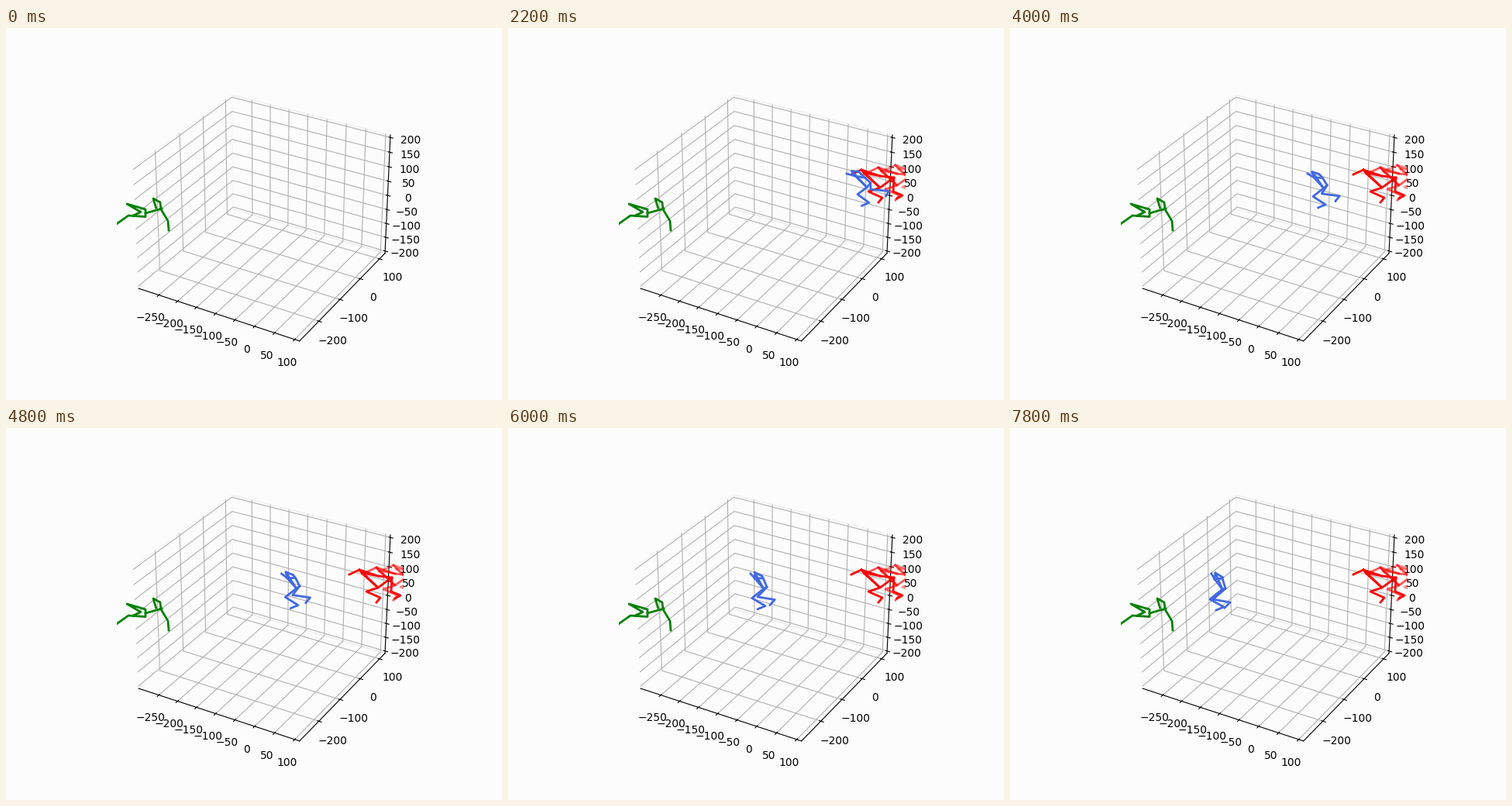
Recreate the animation shown at these times as a matplotlib script. Size 640 px wide and 480 px high, loop 8 s.

```python
import matplotlib.pyplot as plt
import numpy as np
from matplotlib.animation import FuncAnimation

STEP = 200            # ms per frame
FRAMES = 40
RUN_START, RUN_END = 1800, 7800
BACK = "#fcfcfc"

fig = plt.figure(figsize=(6.4, 4.8), dpi=100, facecolor=BACK)

# 3D stage: the box reaches 1/48 past a span of 400 on each side
ax = fig.add_subplot(projection="3d", facecolor=BACK)
half = 200 * 25 / 24
for set_lim, mid in ((ax.set_xlim, -96.6), (ax.set_ylim, -79.5), (ax.set_zlim, 0)):
    set_lim(mid - half, mid + half)
ax.set_xticks(range(-250, 101, 50))
ax.set_yticks(range(-200, 101, 100))
ax.set_zticks(range(-200, 201, 50))
for axis in (ax.xaxis, ax.yaxis, ax.zaxis):
    axis.pane.set_fill(False)

# Overlay in pixel coordinates, clipped to the same square as the stage
top = fig.add_axes([0.22375, 0.11, 0.5775, 0.77])
top.set_xlim(143.2, 512.8)
top.set_ylim(427.2, 57.6)
top.set_axis_off()


def bone(points, color, alpha=1.0):
    return top.plot(*np.transpose(points), color=color, lw=2, alpha=alpha)[0]


# Resting figure
for path in (
    [(141, 254), (158, 242), (180, 243.5), (180, 234), (156, 227), (174, 237.5), (164, 242)],
    [(180, 239), (201, 233)],
    [(193.5, 232), (190, 220), (199, 225), (200, 234), (209, 249), (210, 261)],
):
    bone(path, "green")

# Joints: hand, elbow, neck, other hand, other elbow, two hips,
# then knee, ankle and toe of each leg, measured from the first hand
LIMBS = [
    [0, 1, 2, 6, 10, 11, 12],
    [1, 5, 7, 8, 9],
    [1, 3, 4, 2],
    [3, 5, 6],
]
CROUCH = np.array([
    (0, 0), (13, -6), (37, 2), (17, -1), (18, -2), (37, 17), (55, 4),
    (22, 22), (40, 30), (35, 36), (54, 22), (66, 27), (59, 31)])
STRIDE = np.array([
    (0, 0), (13, 2), (26, 5), (7, -4), (15, -5), (29, 17), (34, 10),
    (18, 25), (32, 36), (23, 40), (38, 17), (62, 19), (59, 25)])
UPRIGHT = np.array([
    (0, 0), (4, 7), (14, 6), (5, -1), (15, 5), (14, 20), (18, 19),
    (-2, 33), (16, 43), (6, 47), (2, 33), (24, 37), (17, 44)])

# Red figures appear one after another, the faintest first and furthest right
ghosts = []
for k, alpha in ((2, 0.45), (1, 0.65), (0, 1.0)):
    body = CROUCH + (443 + 22 * k, 189 - 3 * k)
    ghosts.append((RUN_START - 600 * k, [bone(body[limb], "red", alpha) for limb in LIMBS]))

runner = [bone([(0, 0)], "royalblue") for _ in LIMBS]


def runner_joints(t):
    u = max(0, (t - RUN_START) / (RUN_END - RUN_START))
    x = 447 - 187 * u + 2 * np.sin(np.pi * u) + 5 * np.sin(2 * np.pi * u)
    return STRIDE + (UPRIGHT - STRIDE) * u ** 0.6 + (x, 188)


def draw(i):
    t = i * STEP
    for start, lines in ghosts:
        for line in lines:
            line.set_visible(t >= start)
    joints = runner_joints(t)
    for line, limb in zip(runner, LIMBS):
        line.set_data(*joints[limb].T)
        line.set_visible(t >= RUN_START)
    return runner


anim = FuncAnimation(fig, draw, frames=FRAMES, interval=STEP, repeat=True,
                     repeat_delay=0, blit=False)
plt.show()
```
